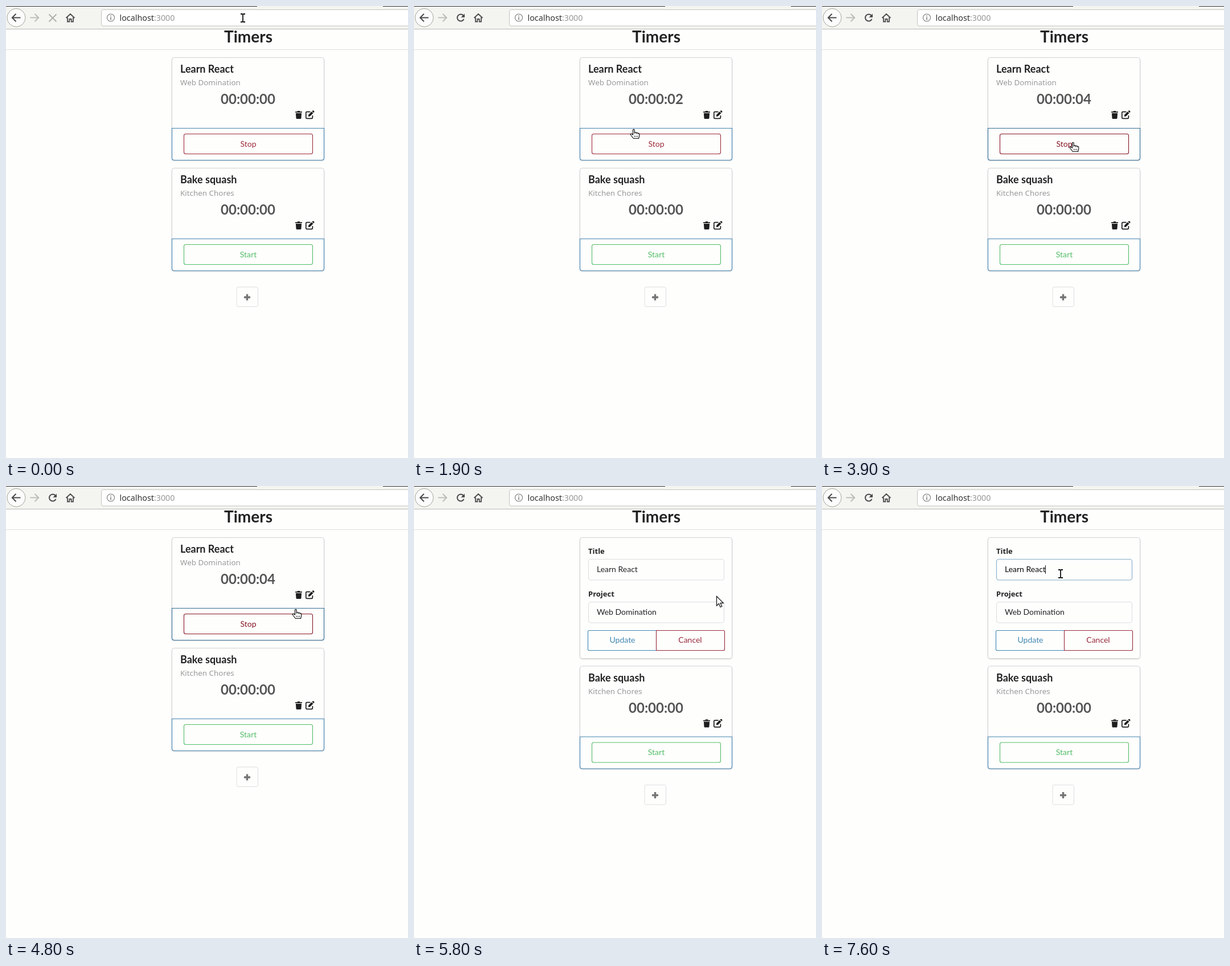
Write an HTML page that moves like this. It is 706 px wide and 793 px high and loops after 8000 ms.

```html
<!DOCTYPE html>
<html lang="en">
<head>
<meta charset="utf-8">
<title>Timers</title>
<style>
html, body { margin: 0; width: 100%; height: 100%; overflow: hidden; background: #fefefd; }
svg { display: block; width: 706px; height: 793px; font: 14px Lato, sans-serif; }
.sans { font-family: "Noto Sans", sans-serif; }
.mid { text-anchor: middle; }
.head { font-weight: 700; font-size: 18px; fill: #222; }
.meta { font-size: 13.4px; fill: #999; }
.clock { font-weight: 700; font-size: 24px; fill: #555; }
.label { font-weight: 700; font-size: 13px; fill: #222; }
.line { fill: none; stroke-width: 1.1; }
.nav { fill: none; stroke: #4c4c4c; stroke-width: 2; }
</style>
</head>
<body>
<svg viewBox="0 0 706 793">
  <defs>
    <filter id="soft" x="-5%" y="-5%" width="110%" height="112%">
      <feDropShadow dx="0" dy="1" stdDeviation="1" flood-color="#000" flood-opacity=".16"/>
    </filter>
    <g id="tools" fill="#1e1e1e">
      <path d="M508 185.2h3.4l.8-1.2h3.6l.8 1.2h3.4v1.7h-12zM508.9 188h10.200l-.6 8.700q-.1 1.300-1.400 1.300h-6.200q-1.300 0-1.400-1.300z"/>
      <path d="M534.500 185.700h-6q-1.700 0-1.700 1.700v8.200q0 1.700 1.700 1.700h8.200q1.700 0 1.700-1.700v-3.600" fill="none" stroke="#1e1e1e" stroke-width="1.700"/>
      <path d="M530.800 193.900l.4-3.100 5.600-5.600 2.700 2.700-5.600 5.600zM537.500 184.500l1-1q.8-.7 1.600 0l1.100 1.100q.7.800 0 1.600l-1 1z"/>
    </g>
  </defs>

  <rect width="706" height="793" fill="#fefefd"/>
  <rect width="706" height="40" fill="#f4f4f1"/>
  <path d="M0 .5H441M662 .5H706" stroke="#33322f"/>
  <path d="M0 40.500H706" stroke="#b9b9b6"/>
  <circle cx="18" cy="20.500" r="16" fill="#fcfcfb" stroke="#a3a39f"/>
  <path class="nav" d="M25.500 20.500H11M17.500 13.800L10.800 20.500l6.700 6.700"/>
  <path class="nav" d="M42.500 20.500H57M50.500 13.800L57.200 20.500l-6.700 6.700" style="stroke:#bdbdba"/>
  <path id="halt" class="nav" d="M75.500 14.500l13 13M88.500 14.500l-13 13" style="stroke:#b0b0ad"/>
  <g id="reload">
    <path class="nav" d="M86.500 16.500A6 6 0 1 0 87.600 22.800"/>
    <path d="M89 13.500v6.500h-6.500z" fill="#4c4c4c"/>
  </g>
  <path class="nav" d="M105.500 21l7.500-7 7.500 7M108 20v7.500h3.300v-4.500h3.400v4.500h3.300V20" style="stroke-width:1.800"/>
  <rect x="167.500" y="6.500" width="560" height="28.500" rx="3" fill="#fff" stroke="#c3c3c0"/>
  <circle cx="184" cy="20.500" r="6.500" fill="none" stroke="#777" stroke-width="1.100"/>
  <path d="M184 19.500v5M184 16.500v1.700" stroke="#777" stroke-width="1.500"/>
  <text class="sans" x="199.500" y="26" font-size="14.300" fill="#333">localhost<tspan fill="#999">:3000</tspan></text>

  <text class="mid" x="425.500" y="63.500" font-size="28" font-weight="700" fill="#222">Timers</text>
  <path d="M0 76.500H706" stroke="#dededd"/>

  <g id="first"></g>
  <g id="form">
    <rect x="291.500" y="90.500" width="267" height="212" rx="4" fill="#fefefd" stroke="#d4d4d5" filter="url(#soft)"/>
    <text class="label sans" x="306" y="119">Title</text>
    <rect id="field" class="line" x="306.500" y="128.500" width="238" height="36.500" rx="4"/>
    <text id="value" x="321" y="151">Learn React</text>
    <path id="caret" d="M392.500 139v15" stroke="#111"/>
    <text class="label sans" x="306" y="194">Project</text>
    <rect class="line" x="306.500" y="203.500" width="238" height="36.500" rx="4" stroke="#dededf"/>
    <text x="321" y="226" fill="#222">Web Domination</text>
    <path class="line" d="M425.500 253.500H307.500q-2 0-2 2v31q0 2 2 2H425.500" stroke="#3f87b3"/>
    <path class="line" d="M425.500 253.500h118q2 0 2 2v31q0 2-2 2h-118z" stroke="#982a3a"/>
    <text class="mid" x="366" y="275" fill="#3f87b3">Update</text>
    <text class="mid" x="485" y="275" fill="#982a3a">Cancel</text>
  </g>
  <g id="rest">
    <g id="second"></g>
    <rect x="405" y="493" width="37.500" height="34.500" rx="3" fill="#fefefd" stroke="#dededf"/>
    <path d="M423.500 505.500v11M418 511h11" stroke="#757575" stroke-width="3.400"/>
  </g>

  <g id="pointer">
    <g id="beam" fill="none">
      <path d="M-4-7h2.500Q0-7 0-5.500Q0-7 1.500-7H4M0-6V6M-4 7h2.500Q0 7 0 5.500Q0 7 1.500 7H4" stroke="#fff" stroke-width="3.600"/>
      <path d="M-4-7h2.500Q0-7 0-5.500Q0-7 1.500-7H4M0-6V6M-4 7h2.500Q0 7 0 5.500Q0 7 1.500 7H4" stroke="#111" stroke-width="1.800"/>
    </g>
    <path id="arrow" d="M.5.5v16.500l3.900-3.700 2.700 6.200 2.700-1.200-2.700-6h5.200z" fill="#fff" stroke="#111" stroke-width="1.200"/>
    <g id="hand" stroke="#111" stroke-width="1.200" stroke-linejoin="round">
      <path d="M-1.500 10V1.500Q-1.500.3-.2.3T1.200 1.500V6Q3.500 5 4.300 6.600 6.300 5.800 7.200 7.300 9.600 6.800 9.700 9v3.200l-1.200 4.300H-.5l-4.700-6Q-6.200 8.600-4.800 8.200-3.400 8-1.500 10z" fill="#fff"/>
      <path d="M1.200 6v2.500M4.300 6.800v2M7.200 7.500v1.800M1.500 11.500v3M4 11.500v3M6.500 11.500v3" fill="none" stroke-width=".8"/>
    </g>
  </g>
</svg>
<script>
const $ = id => document.getElementById(id);
const show = (id, on) => $(id).style.display = on ? "" : "none";
const clamp = v => Math.max(0, Math.min(1, v));
const mix = (a, b, k) => `rgb(${a.map((v, i) => Math.round(v + (b[i] - v) * k))})`;

function card(id, y, title, project, action, color) {
  $(id).innerHTML = `<g transform="translate(0 ${y})">
    <rect x="291.5" y=".5" width="267" height="180" rx="4" fill="#fefefd" stroke="#d4d4d5" filter="url(#soft)"/>
    <text class="head" x="306" y="27">${title}</text>
    <text class="meta sans" x="306" y="49">${project}</text>
    <text class="clock mid" x="425" y="82">00:00:00</text>
    <use href="#tools" y="-90"/>
    <path class="line edge" d="M291.5 124.500h267v52q0 4-4 4h-259q-4 0-4-4z" stroke="#4583b0"/>
    <rect class="line btn" x="312.500" y="134.500" width="226" height="35" rx="3" stroke="${color}"/>
    <text class="mid cap" x="425.500" y="156.500" fill="${color}">${action}</text>
  </g>`;
}
card("first", 90, "Learn React", "Web Domination", "Stop", "#9c2c3a");
card("second", 284, "Bake squash", "Kitchen Chores", "Start", "#52bd66");

const part = name => $("first").querySelector(name);
const clock = part(".clock"), edge = part(".edge"), btn = part(".btn"), cap = part(".cap");

// time, pointer shape, x, y
const path = [
  [0, "beam", 416, 21], [200, "arrow", 578, 71], [400, "beam", 470, 14],
  [500, "beam", 400, 22], [600, "beam", 400, 22], [900, "beam", 269, 29],
  [1000, "arrow", 285, 62], [1200, "arrow", 331, 126], [1400, "arrow", 331, 126],
  [1500, "arrow", 367, 203], [1800, "arrow", 367, 203], [1900, "hand", 386, 216],
  [2400, "hand", 418, 244], [2600, "hand", 418, 244], [2900, "hand", 426, 246],
  [3500, "hand", 426, 246], [3700, "hand", 439, 239], [3800, "hand", 439, 239],
  [4100, "hand", 444, 238], [4500, "hand", 444, 238], [4800, "hand", 509, 216],
  [5200, "hand", 532, 189], [5300, "hand", 532, 189], [5500, "hand", 534, 187],
  [5600, "arrow", 533, 191], [5800, "arrow", 531, 193], [6000, "arrow", 531, 193],
  [6100, "beam", 475, 157], [6200, "beam", 411, 136], [6400, "beam", 411, 136],
  [6800, "beam", 419, 154], [8000, "beam", 419, 154]
];

function movePointer(t) {
  const i = path.findIndex(p => p[0] > t);
  const [t0, shape, x0, y0] = path[i - 1], [t1, , x1, y1] = path[i];
  const k = (t - t0) / (t1 - t0);
  for (const s of ["beam", "arrow", "hand"]) show(s, s === shape);
  $("pointer").setAttribute("transform",
    `translate(${Math.round(x0 + (x1 - x0) * k)} ${Math.round(y0 + (y1 - y0) * k)})`);
}

function draw(ms) {
  const t = Math.floor((ms % 8000) / 100) * 100; // ten pictures a second
  const editing = t >= 5600;
  movePointer(t);

  show("halt", t < 100);
  show("reload", t >= 100);
  $("reload").setAttribute("opacity", t < 700 ? .45 : 1);

  clock.textContent = "00:00:0" + Math.floor((t + 100) / 1000);
  const hover = clamp((t - 1900) / 200) * clamp((5100 - t) / 200);
  const red = mix([156, 44, 58], [134, 22, 38], hover);
  btn.setAttribute("stroke", red);
  cap.setAttribute("fill", red);
  edge.setAttribute("stroke", mix([69, 131, 176], [52, 111, 148], hover));

  show("first", !editing);
  show("form", editing);
  $("rest").setAttribute("transform", `translate(0 ${editing ? 31.5 : 0})`);

  const focus = clamp((t - 7400) / 200);
  $("field").setAttribute("stroke", mix([222, 222, 223], [133, 173, 200], focus));
  $("value").setAttribute("fill", mix([34, 34, 34], [8, 8, 8], focus));
  show("caret", focus > 0);
}

const start = performance.now();
function tick() {
  draw(performance.now() - start);
  requestAnimationFrame(tick);
}
draw(0);
tick();
</script>
</body>
</html>
```
